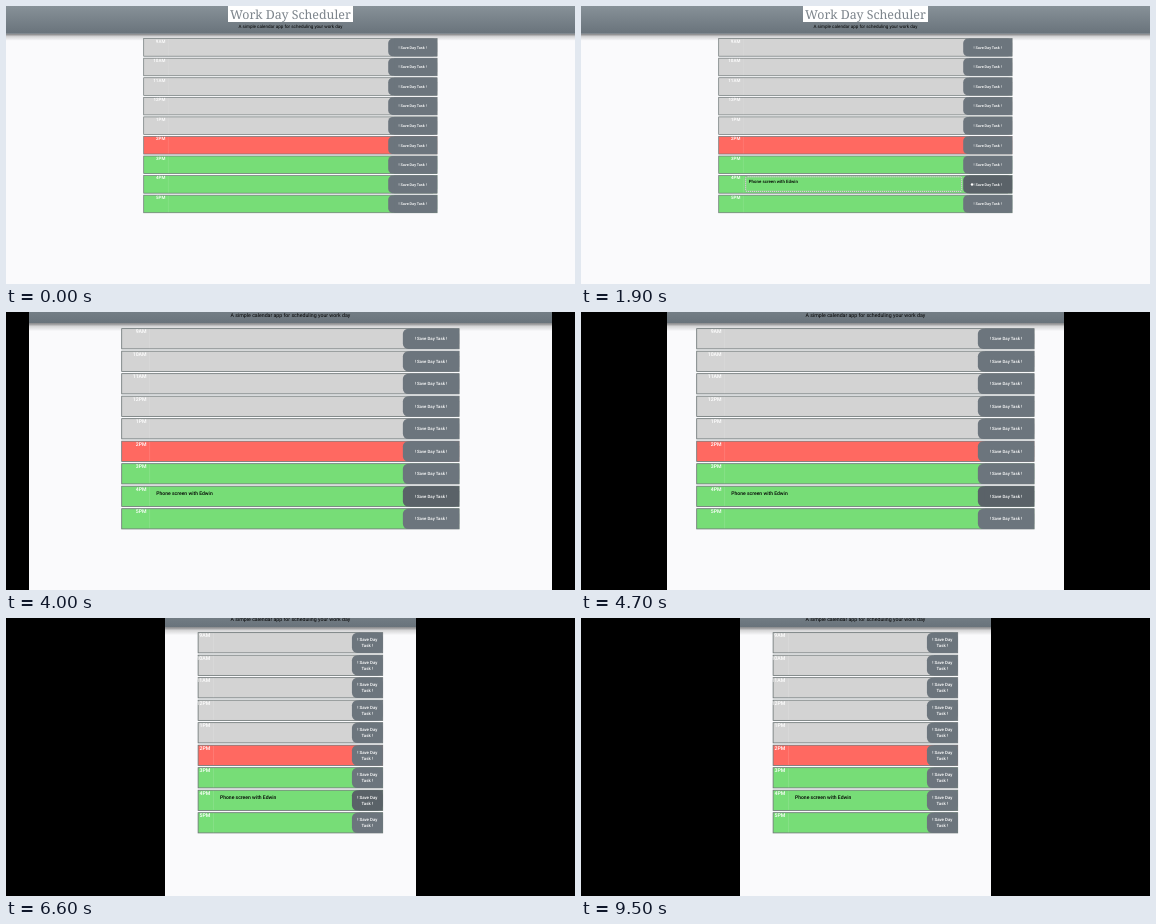
Recreate the animation shown at these times as an HTML page. Size 569x278 px, loop 9.9 s.

```html
<!DOCTYPE html>
<html lang="en">
<head>
<meta charset="utf-8">
<title>Work Day Scheduler</title>
<style>
html, body { margin: 0; width: 100%; height: 100%; overflow: hidden; background: #000; }
svg { display: block; width: 569px; height: 278px; font-family: Roboto, Inter, sans-serif; text-rendering: geometricPrecision; }
.title { font: 300 12.4px "Noto Serif", "Liberation Serif", serif; fill: #7d858c; text-anchor: middle; }
.sub { font-size: 4.55px; text-anchor: middle; }
.hour { font-size: 4.5px; font-weight: 500; fill: #fff; text-anchor: end; }
.save { font-size: 3.8px; font-weight: 500; fill: #fff; text-anchor: middle; }
.task { font-size: 4.4px; font-weight: 500; }
</style>
</head>
<body>
<svg viewBox="0 0 569 278">
  <defs>
    <linearGradient id="head" x2="0" y2="1">
      <stop stop-color="#879198"/><stop offset="1" stop-color="#69737b"/>
    </linearGradient>
    <linearGradient id="shade" x2="0" y2="1">
      <stop stop-color="#000" stop-opacity=".5"/>
      <stop offset=".4" stop-color="#000" stop-opacity=".15"/>
      <stop offset="1" stop-color="#000" stop-opacity="0"/>
    </linearGradient>
  </defs>
  <g id="stage"></g>
</svg>
<script>
const LOOP = 9900, MID = 284.4, ROW = 19.57, ROW_H = 17.6;
const TASK = 'Phone screen with Edwin';
const HOURS = ['9AM', '10AM', '11AM', '12PM', '1PM', '2PM', '3PM', '4PM', '5PM'];
const TASK_ROW = 7;

// Keyframes as [ms, value], linear in between.
const ZOOM = [[3400, 1], [3500, 1.035], [4000, 1.15]];
const HALF = [[3400, 290], [3500, 286], [4000, 261.5], [4200, 261.5], [4700, 198.5],
  [5100, 198.5], [5500, 144], [5700, 132], [6100, 126], [6200, 125.5]];
const TYPED = [[600, 0], [900, 6], [1100, 6], [1700, TASK.length]];

function at(keys, t) {
  if (t <= keys[0][0]) return keys[0][1];
  for (let i = 1; i < keys.length; i++) {
    const [t0, a] = keys[i - 1], [t1, b] = keys[i];
    if (t <= t1) return a + (b - a) * (t - t0) / (t1 - t0);
  }
  return keys[keys.length - 1][1];
}

const rect = (x, y, w, h, fill, more = '') =>
  `<rect x="${x}" y="${y}" width="${w}" height="${h}" fill="${fill}" ${more}/>`;
const text = (kind, x, y, words) => `<text class="${kind}" x="${x}" y="${y}">${words}</text>`;

function row(i, t, width) {
  const y = 32.6 + i * ROW, left = MID - width / 2;
  const cell = left + width / 12, btnW = width / 6, btn = left + width - btnW;
  const color = i < 5 ? '#d3d3d3' : i > 5 ? '#77dd77' : '#ff6961';
  const active = i === TASK_ROW;
  const hover = active && t >= 1800 && t < 6800;
  const btnColor = hover ? '#5a6268' : '#6c757d';
  let out = rect(left, y, width, ROW_H, color, 'stroke="#6b7474" stroke-width=".7"')
    + rect(cell - .2, y + .5, .4, ROW_H - 1, '#fff', 'opacity=".25"')
    + text('hour', cell - 2.8, y + 3.9, HOURS[i]);
  if (active) {
    if (t >= 300 && t < 2100) {
      const box = [cell + 2.5, y + 1.2, btn - cell - 4, ROW_H - 3, 'none'];
      out += rect(...box, 'rx="1" stroke="#f4fbf4" stroke-width=".9"')
        + rect(...box, 'rx="1" stroke="#333" stroke-width=".5" stroke-dasharray="1 1"');
    }
    out += text('task', cell + 5.6, y + 7.8, TASK.slice(0, Math.round(at(TYPED, t))));
  }
  out += rect(btn, y, btnW, ROW_H, btnColor, 'rx="4.5"')
    + rect(btn + 6, y, btnW - 6, ROW_H, btnColor);
  const lines = width < 200 ? ['! Save Day', 'Task !'] : ['! Save Day Task !'];
  lines.forEach((line, n) => {
    out += text('save', btn + btnW / 2, y + 10.1 + (n - (lines.length - 1) / 2) * 5.4, line);
  });
  return out;
}

function draw(t) {
  const zoom = at(ZOOM, t), half = at(HALF, t);
  const [width, shift] = half > 171 ? [293.4, 0] : half > 131 ? [213.6, -.9] : [160.5, -2];
  const page = rect(0, 0, 569, 278, '#fafafc')
    + `<g transform="translate(${MID} ${139 + shift}) scale(${zoom}) translate(${-MID} -139)">`
    + rect(-20, 27.8, 610, 7, 'url(#shade)')
    + rect(-20, 0, 610, 27.8, 'url(#head)')
    + rect(222, 0, 125, 16, '#fff')
    + text('title', MID, 13, 'Work Day Scheduler')
    + text('sub', MID, 22.2, 'A simple calendar app for scheduling your work day')
    + HOURS.map((_, i) => row(i, t, width)).join('') + '</g>';
  const edge = Math.max(0, 284.5 - half);
  const bars = rect(0, 0, edge, 278, '#000') + rect(569 - edge, 0, edge, 278, '#000');
  const pointer = t >= 1800 && t < 2300 ? '<circle cx="391" cy="178.5" r="1.2" fill="#fff"/>' : '';
  document.getElementById('stage').innerHTML = page + pointer + bars;
}

const start = performance.now();
let shown = -1;
function tick(now) {
  const t = Math.floor(Math.max(0, now - start) % LOOP / 100) * 100;
  if (t !== shown) draw(shown = t);
  requestAnimationFrame(tick);
}
tick(start);
</script>
</body>
</html>
```
